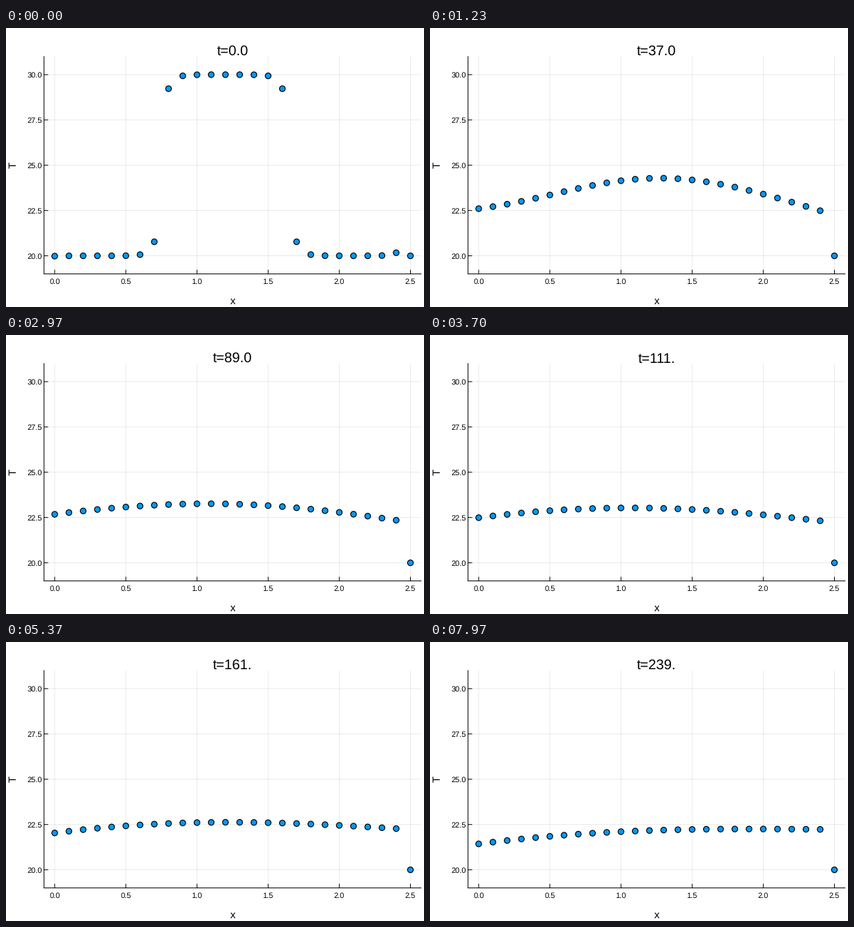
Animation, 600 px wide and 400 px high, one loop 8000 ms. Source, as a matplotlib script:

```python
import numpy as np
import matplotlib.pyplot as plt
from matplotlib.animation import FuncAnimation
from matplotlib.collections import LineCollection

W, H, DPI = 600, 400, 100
PX = 72 / DPI  # points per pixel
UNITS, LOOP_MS = 240, 8000
TICK_MS = 10  # time resolution; each unit lasts 30 or 40 ms
STEPS = 10  # solver steps per time unit
CELLS = 25  # solved nodes; the last plotted node stays at 20
R = 0.1  # diffusion number of one step

plt.rcParams["font.family"] = "Liberation Sans"
plt.rcParams["text.hinting"] = "none"


def solve():
    """Implicit heat equation: outward flux on the left, leaky wall on the right."""
    a = np.diag(np.full(CELLS, 1 + 2 * R))
    a -= R * (np.eye(CELLS, k=1) + np.eye(CELLS, k=-1))
    a[0, 1] = -2 * R
    a[-1, -1] -= 0.1 * R
    inv = np.linalg.inv(a)

    load = np.zeros(CELLS)
    load[0] = -2 * R * 0.1
    load[-1] = R * 20

    temp = np.full(CELLS, 20.0)
    temp[8:17] = 30
    rows = []
    for step in range(STEPS * (UNITS - 1) + 1):
        temp = inv @ (temp + load)
        if step % STEPS == 0:
            rows.append(np.append(temp, 20.0))
    return np.array(rows)


def to_x(x):
    return 69.9 + 204.24 * x


def to_y(temp):
    return 326.6 - 25.97 * (temp - 20)


# The axes span the whole stage, in pixels from the top left corner.
fig = plt.figure(figsize=(W / DPI, H / DPI), dpi=DPI, facecolor="white")
ax = fig.add_axes([0, 0, 1, 1])
ax.set_xlim(0, W)
ax.set_ylim(H, 0)
ax.axis("off")


def lines(segments, width, **kw):
    ax.add_collection(LineCollection(segments, linewidths=width * PX, color="black",
                                     snap=False, **kw), autolim=False)


def label(x, y, text, size, ha="center", va="baseline", **kw):
    return ax.text(x, y, text, fontsize=size * PX, ha=ha, va=va, **kw)


left, right = to_x(-0.075), to_x(2.575)
top, bottom = to_y(31), to_y(19)
x_ticks = np.arange(0, 2.6, 0.5)
y_ticks = np.arange(20, 31, 2.5)

grid = [[(to_x(v), top), (to_x(v), bottom)] for v in x_ticks]
grid += [[(left, to_y(v)), (right, to_y(v))] for v in y_ticks]
lines(grid, 0.8, alpha=0.1)

frame = [[(left, top), (left, bottom)], [(left, bottom), (right, bottom)]]
frame += [[(to_x(v), bottom), (to_x(v), bottom - 5.4)] for v in x_ticks]
frame += [[(left, to_y(v)), (left + 5.4, to_y(v))] for v in y_ticks]
lines(frame, 1, capstyle="projecting")

for v in x_ticks:
    label(to_x(v), 367, f"{v:.1f}", 11)
for v in y_ticks:
    label(51.8, to_y(v) + 4, f"{v:.1f}", 11, ha="right")
label(325.2, 396, "x", 15)
label(11, 196.7, "T", 15, va="center", rotation=90)
title = label(325.4, 40, "", 20.2)

xs = to_x(np.arange(CELLS + 1) * 0.1)
ys = to_y(solve())
dots = ax.scatter(xs, ys[0], s=np.full(CELLS + 1, (8.2 * PX) ** 2), c="#009AFA",
                  edgecolors="black", linewidths=1.2 * PX, zorder=5)


def draw(tick):
    n = (3 * tick + 1) // 10
    dots.set_offsets(np.column_stack([xs, ys[n]]))
    title.set_text("t=" + f"{n:.1f}"[:4])
    return dots, title


anim = FuncAnimation(fig, draw, frames=LOOP_MS // TICK_MS, interval=TICK_MS,
                     repeat=True, repeat_delay=0, blit=False)
plt.show()
```
